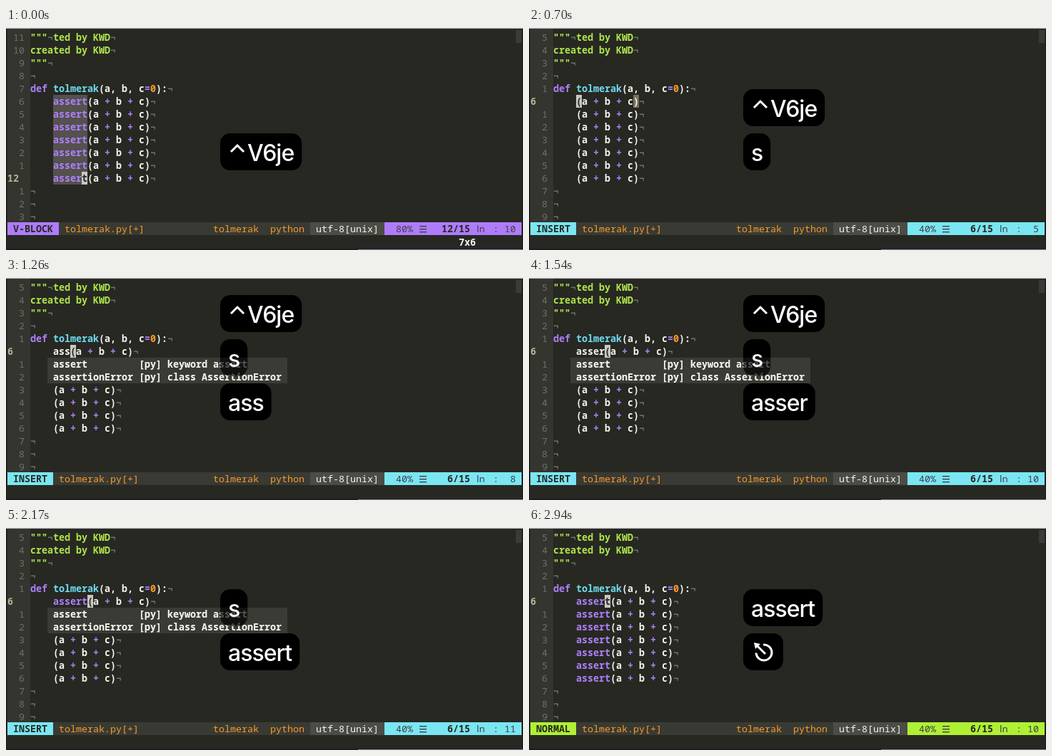
Write an HTML page with a canvas that moves like this. It is 724 px wide and 312 px high and loops after 3.01 s.

```html
<!DOCTYPE html>
<html lang="en">
<head>
<meta charset="utf-8">
<title>Block editing</title>
<style>
html, body { margin: 0; width: 724px; height: 312px; overflow: hidden; background: #272822; }
canvas { display: block; }
</style>
</head>
<body>
<canvas id="stage" width="724" height="312"></canvas>
<script>
const ctx = document.getElementById('stage').getContext('2d');
const LOOP = 3010, CELL = 8, ROW = 18, LEFT = 34;
const BG = '#272822', WHITE = '#f5f5ef', PURPLE = '#ae81ff', CYAN = '#6fdcf0',
      LIME = '#b0e64c', ORANGE = '#f89a2c', DIM = '#6f7068', CURSOR = '#c8c8c3';
const MONO = '"Noto Sans Mono", "DejaVu Sans Mono", monospace';
const NAME = 'tolmerak', AUTHOR = 'KWD';

// Key times in ms
const S_KEY = 310, INSERT = 400, MENU = 1240, ESC = 2650;
const TYPED = [['a', 765], ['s', 905], ['s', 1185], ['e', 1395], ['r', 1535], ['t', 1675]];

const rowTop = row => 4 + row * ROW;
const colX = col => LEFT + col * CELL;

function box(x, y, w, h, color) {
  ctx.fillStyle = color;
  ctx.fillRect(x, y, w, h);
}

function put(text, x, y, color, weight = 500, family = MONO) {
  ctx.font = `${weight} 13.333px ${family}`;
  ctx.letterSpacing = '0px';
  ctx.fillStyle = color;
  ctx.fillText(text, x, y);
}

// Draws alternating text and colour pairs, then the end-of-line mark.
function line(row, ...parts) {
  let col = 0;
  for (let i = 0; i < parts.length; i += 2) {
    put(parts[i], colX(col), rowTop(row) + 14, parts[i + 1], 600);
    col += parts[i].length;
  }
  put('¬', colX(col), rowTop(row) + 14, DIM, 600);
}

function cell(row, col, char, back, color) {
  box(colX(col), rowTop(row), CELL, ROW, back);
  put(char, colX(col), rowTop(row) + 14, color, 600);
}

function call(row, word) {
  const color = /^(as|assert)$/.test(word) ? PURPLE : WHITE;
  line(row, '    ', WHITE, word, color, '(a ', WHITE, '+', PURPLE, ' b ', WHITE, '+', PURPLE, ' c)', WHITE);
}

function gutter(current) {
  box(2, 1, 32, 272, '#34352f');
  for (let row = 0; row < 15; row++) {
    const here = row === current;
    const label = String(here ? row + 1 : Math.abs(row - current));
    const x = here ? 2 : 26 - label.length * CELL;
    put(label, x, rowTop(row) + 14, here ? '#b8b293' : DIM, here ? 700 : 500);
  }
}

function status(mode, color, current, column) {
  const base = 287, dark = '#3f4047', edge = 2 + (mode.length + 2) * CELL;
  box(2, 273, 720, ROW, '#393a33');
  box(2, 273, edge - 2, ROW, color);
  put(mode, 10, base, BG, 700);
  put(NAME + '.py[+]', edge + 8, base, ORANGE);
  put(NAME, 290, base, ORANGE);
  put('python', 370, base, ORANGE);
  box(426, 273, 104, ROW, '#4b4c45');
  put('utf-8[unix]', 434, base, WHITE);
  box(530, 273, 192, ROW, color);
  put(current === 11 ? '80%' : '40%', 546, base, dark);
  for (const y of [278, 282, 286]) box(579, y, 10, 1.4, dark);
  const place = `${current + 1}/15`;
  put(place, 650 - place.length * CELL, base, BG, 700);
  put('ln', 659, base, dark, 500, '"Noto Sans", sans-serif');
  put(':', 682, base, dark);
  put(String(column).padStart(2), 698, base, dark);
}

function menu() {
  box(58, rowTop(6), 336, 2 * ROW, '#3a3b35');
  put('assert         [py] keyword assert', 66, rowTop(6) + 14, WHITE, 600);
  put('assertionError [py] class AssertionError', 66, rowTop(7) + 14, WHITE, 600);
}

function stroke(width, draw) {
  ctx.beginPath();
  draw();
  ctx.lineWidth = width;
  ctx.strokeStyle = '#fff';
  ctx.stroke();
}

function caret(y) {
  stroke(3, () => {
    ctx.moveTo(315, y + 26);
    ctx.lineTo(324, y + 17);
    ctx.lineTo(333, y + 26);
  });
}

function escapeSign(y) {
  stroke(3, () => ctx.arc(329, y + 27, 11, -1.65, 3.1));
  stroke(2.8, () => {
    ctx.moveTo(331, y + 29);
    ctx.lineTo(319, y + 17);
  });
  ctx.beginPath();
  ctx.moveTo(315, y + 13);
  ctx.lineTo(324, y + 15);
  ctx.lineTo(317, y + 22);
  ctx.fill();
}

function keycap(label, y, alpha = 1) {
  if (alpha <= 0) return;
  ctx.globalAlpha = alpha;
  ctx.font = '500 32px Inter, "Liberation Sans", sans-serif';
  ctx.letterSpacing = '-1px';
  const ctrl = label[0] === '^', esc = label === 'esc';
  const text = ctrl ? label.slice(1) : label;
  const start = ctrl ? 338 : 311;
  const width = esc ? 56 : start - 300 + ctx.measureText(text).width + 11;
  ctx.fillStyle = '#000';
  ctx.beginPath();
  ctx.roundRect(300, y, width, 52, 14);
  ctx.fill();
  ctx.fillStyle = '#fff';
  if (esc) escapeSign(y);
  else ctx.fillText(text, start, y + 39);
  if (ctrl) caret(y);
  ctx.globalAlpha = 1;
}

const fade = (t, from, length) => Math.max(0, Math.min(1, 1 - (t - from) / length));

function keys(t, typed) {
  const block = fade(t, 1680, 210), s = fade(t, 2290, 230);
  if (t < S_KEY) return keycap('^V6je', 148);
  if (t >= ESC) {
    keycap('assert', 86);
    return keycap('esc', 148);
  }
  const lift = typed ? 62 : 0;
  keycap('^V6je', 86 - lift, block);
  keycap('s', 148 - lift, s);
  if (typed) keycap(typed, 148);
}

// The menu glows faintly through the keycap that covers it.
function menuGlow() {
  ctx.save();
  ctx.globalCompositeOperation = 'lighten';
  ctx.globalAlpha = 0.3;
  menu();
  ctx.restore();
}

function draw(t) {
  const visual = t < INSERT, normal = t >= ESC, inserting = !visual && !normal;
  const typed = TYPED.filter(([, at]) => t >= at).map(([key]) => key).join('');
  const current = visual ? 11 : 5;
  const menuOpen = inserting && t >= MENU;

  box(0, 0, 724, 312, BG);
  gutter(current);

  line(0, '"""', LIME, '¬', DIM, 'ted by ' + AUTHOR, LIME);
  line(1, 'created by ' + AUTHOR, LIME);
  line(2, '"""', LIME);
  line(3);
  line(4, 'def ', PURPLE, NAME, CYAN, '(a, b, c', WHITE, '=', PURPLE, '0', ORANGE, '):', WHITE);
  if (visual) box(colX(4), rowTop(5), 6 * CELL, 7 * ROW, '#54514e');
  for (let row = 5; row < 12; row++)
    call(row, !inserting ? 'assert' : row === 5 ? typed : '');
  for (let row = 12; row < 15; row++) line(row);

  const end = 4 + typed.length;
  if (t < S_KEY) {
    cell(11, 9, 't', CURSOR, BG);
    put('7x6', 634, 306, WHITE, 600);
  } else if (visual) {
    cell(5, 4, 'a', CURSOR, BG);
    cell(11, 9, 't', BG, PURPLE);
  } else if (normal) {
    cell(5, 9, 't', CURSOR, BG);
  } else {
    cell(5, end, '(', CURSOR, BG);
    if (menuOpen) menu();
    else cell(5, end + 10, ')', '#75715e', WHITE);
  }

  if (visual) status('V-BLOCK', '#ae7cfa', current, 10);
  else if (normal) status('NORMAL', '#aff034', current, 10);
  else status('INSERT', '#7ae6f2', current, end + 1);

  // Window edges and scroll thumb
  box(714, 3, 8, 18, '#3a3b35');
  box(0, 0, 724, 1, '#a9afb6');
  box(0, 1, 1, 311, '#17191d');
  box(723, 1, 1, 311, '#17191d');
  box(0, 310, 724, 2, '#1b1c24');
  box(493, 311, 231, 1, '#7c8290');

  keys(t, typed);
  if (menuOpen) menuGlow();
}

const begin = performance.now();
function tick() {
  draw((performance.now() - begin) % LOOP);
  requestAnimationFrame(tick);
}
tick();
</script>
</body>
</html>
```
